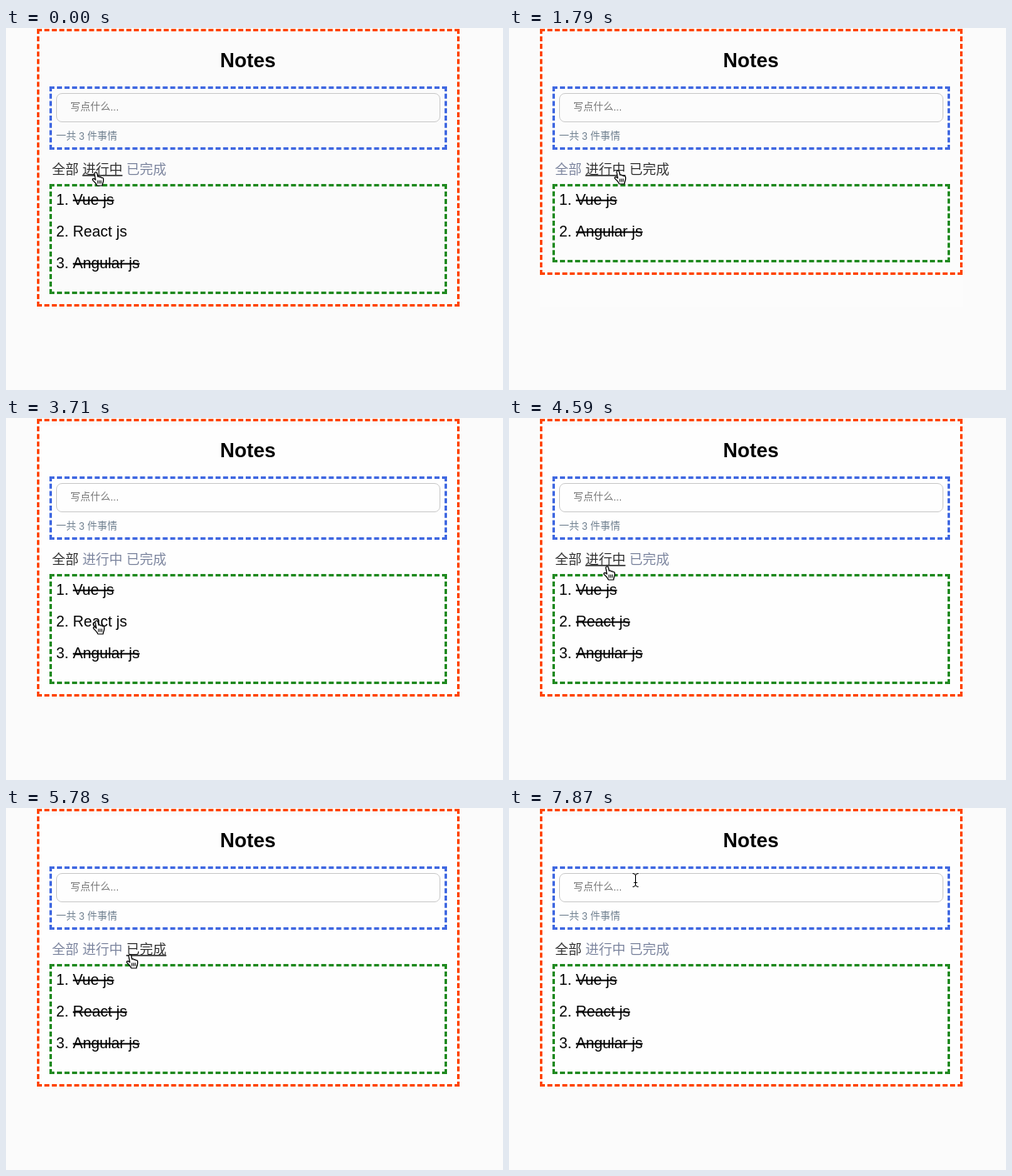
An HTML page for the animation above (8 s loop, 595x434 px).

```html
<!DOCTYPE html>
<html lang="zh-CN">
<head>
<meta charset="utf-8">
<title>Notes</title>
<style>
  html, body { margin: 0; width: 100%; height: 100%; overflow: hidden; background: #fbfbfb; }
  div { position: absolute; box-sizing: border-box; }
  #page { left: 37px; top: 9px; width: 506px; height: 325px; }
  #panel { left: 37px; top: 1px; width: 506px; border: 3px dashed orangered; }
  #form { left: 52px; top: 70px; width: 476px; height: 76px; border: 3px dashed royalblue; }
  #field { left: 60px; top: 78px; width: 460px; height: 35px; border: 1px solid #ccc; border-radius: 7px; }
  #list { left: 52px; top: 187px; width: 476px; border: 3px dashed forestgreen; }
  svg { position: absolute; left: 0; top: 0; }
  text { font: 18px "Liberation Sans", "Noto Sans CJK SC", "Noto Sans CJK", sans-serif; white-space: pre; }
  .title { font-size: 24px; font-weight: bold; }
  .small { font-size: 12px; }
  .tab { font-size: 16px; fill: #7d869f; }
  .tab.dark { fill: #333; }
  .tab.hover { text-decoration: underline; }
  .done { text-decoration: line-through; }
  .mid { text-anchor: middle; }
</style>
</head>
<body>
<div id="page"></div>
<div id="panel"></div>
<div id="form"></div>
<div id="field"></div>
<div id="list"></div>
<svg width="595" height="434">
  <text class="title mid" x="289.5" y="47">Notes</text>
  <text class="small" x="77" y="99" fill="#757575">写点什么...</text>
  <text class="small" x="60" y="134" fill="#708090">一共 3 件事情</text>
  <g id="tabs"></g>
  <g id="items"></g>
  <g id="cursor">
    <g id="hand" stroke="#000" stroke-linejoin="round" stroke-linecap="round">
      <path fill="#fff" stroke-width="1.2" d="M.2 0C1.3-.3 1.9.6 2.1 1.6L3 5.3C4 4.6 5 5 5.2 5.9 6.1 5.3 7.2 5.7 7.4 6.7 8.6 6.2 9.6 6.8 9.6 8V10C9.6 12 8.4 13 8.2 16H2C1.6 14-.8 12-3 9.6-3.8 8.6-3.4 7.5-2.2 7.6-1.2 7.7-.4 8.4.2 9L-1.1 2C-1.3 1-.8.2.2 0Z"/>
      <path fill="none" d="M2.8 10v3.2M4.8 10v3.2M6.8 10v3.2"/>
    </g>
    <path id="arrow" stroke="#fff" d="M0 0V14.5L3.4 11.3 5.6 16.4 7.8 15.4 5.6 10.5H10.3Z"/>
    <path id="beam" fill="none" stroke="#000" d="M-3-7.5Q.5-7.5.5-5V6Q.5 8.5-3 8.5M4-7.5Q.5-7.5.5-5V6Q.5 8.5 4 8.5M-1.5 3.5h4"/>
  </g>
</svg>
<script>
const LOOP = 8000, TICK = LOOP / 54;   // the screen refreshes 54 times per loop
const $ = id => document.getElementById(id);

// Pointer path: [tick, x, y]
const path = [
  [0, 107, 173], [1, 107, 173], [5, 181, 171], [10, 181, 171], [14, 79, 171],
  [18, 79, 171], [19, 78, 170], [20, 78, 170], [25, 108, 243], [27, 108, 243],
  [31, 117, 178], [33, 117, 178], [36, 171, 176], [38, 171, 176], [42, 80, 175],
  [50, 80, 175], [53, 151, 86], [55, 151, 86]
];
// Clicks on the filter tabs: [tick, filter, page shade]
const clicks = [
  [0, 'all', '#fbfbfb'], [1, 'active', '#fcfcfc'], [9, 'done', '#fcfcfc'], [18, 'all', '#fefefe'],
  [33, 'active', '#fdfdfd'], [38, 'done', '#fefefe'], [43, 'all', '#fefefe']
];
const REACT_DONE = 26;
const tabs = [
  { name: 'all', label: '全部', x: 55, width: 32 },
  { name: 'active', label: '进行中', x: 91.4, width: 48 },
  { name: 'done', label: '已完成', x: 143.9, width: 48 }
];

function pointerAt(tick) {
  const i = path.findIndex(p => p[0] > tick);
  const [t0, x0, y0] = path[i - 1], [t1, x1, y1] = path[i];
  const k = (tick - t0) / (t1 - t0);
  return [Math.round(x0 + (x1 - x0) * k), Math.round(y0 + (y1 - y0) * k)];
}

const text = (x, y, label, cls = '') => `<text x="${x}" y="${y}" class="${cls}">${label}</text>`;

function drawTabs(filter, x, y) {
  $('tabs').innerHTML = tabs.map(tab => {
    const hover = y > 160 && y < 180 && x >= tab.x && x < tab.x + tab.width;
    const cls = 'tab' + (hover || tab.name === filter ? ' dark' : '') + (hover ? ' hover' : '');
    return text(tab.x, 175, tab.label, cls);
  }).join('');
}

function drawList(filter, tick) {
  const notes = [['Vue js', true], ['React js', tick >= REACT_DONE], ['Angular js', true]]
    .filter(([, done]) => filter === 'all' || done === (filter === 'done'));
  const height = notes.length ? 18 + 38 * notes.length : 74;
  $('list').style.height = height + 'px';
  $('panel').style.height = height + 201 + 'px';
  $('items').innerHTML = notes.map(([label, done], i) => {
    const y = 212 + 38 * i;
    return text(60, y, i + 1 + '.') + text(80, y, label, done ? 'done' : '');
  }).join('') || text(289.5, 230, 'no data', 'mid');
}

function drawCursor(x, y) {
  const inField = y > 78 && y < 113;
  const shape = inField ? 'beam' : y > 160 ? 'hand' : 'arrow';
  for (const id of ['hand', 'arrow', 'beam']) $(id).style.display = id === shape ? '' : 'none';
  $('cursor').setAttribute('transform', `translate(${x} ${y})`);
}

let shown = -1;
function render() {
  const tick = Math.floor((performance.now() % LOOP + 5) / TICK);
  if (tick !== shown) {
    shown = tick;
    const [x, y] = pointerAt(tick);
    const [, filter, shade] = clicks.filter(c => c[0] <= tick).pop();
    $('page').style.background = shade;
    drawTabs(filter, x, y);
    drawList(filter, tick);
    drawCursor(x, y);
  }
  requestAnimationFrame(render);
}
render();
</script>
</body>
</html>
```
